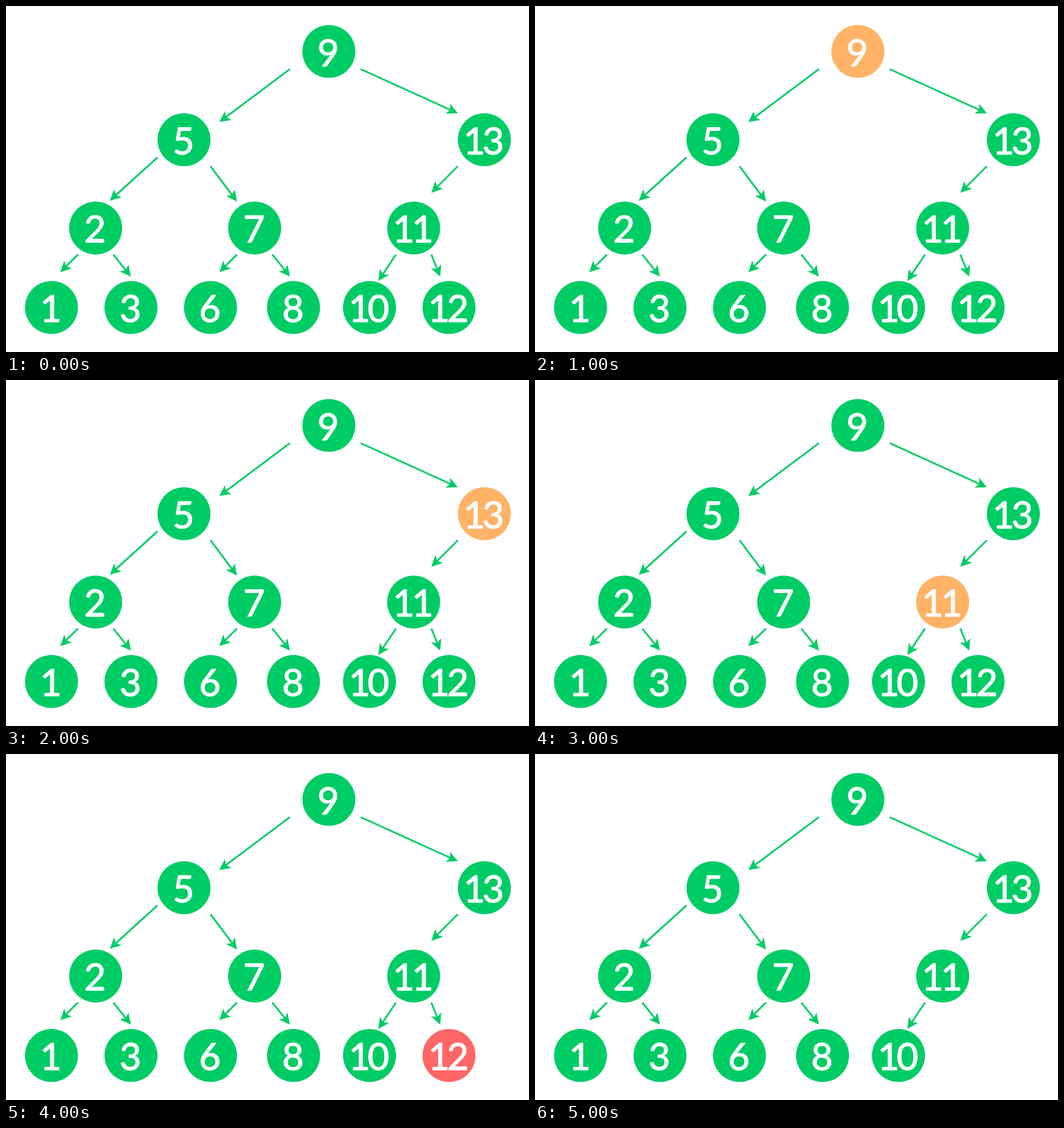
Animation of 920 by 609 pixels, one loop 6000 ms. Source, as an HTML page with a canvas:

```html
<!DOCTYPE html>
<html lang="en">
<head>
<meta charset="utf-8">
<title>Binary search tree: removing a leaf</title>
<style>
  html, body { margin: 0; width: 100%; height: 100%; overflow: hidden; background: #fff; }
  canvas { display: block; }
</style>
</head>
<body>
<canvas id="stage" width="920" height="609"></canvas>
<script>
const canvas = document.getElementById('stage');
const ctx = canvas.getContext('2d');
const GREEN = '#00cc66', ORANGE = '#ffb366', RED = '#ff6666';
const STEP = 1000;
const REMOVED = 12;

// Everything sits on a grid whose zero is the leftmost column and the root's row
const UNIT = 15.54, ORIGIN = 80;
const px = cells => ORIGIN + cells * UNIT;
const rowOf = depth => Math.min(depth * 10, 29);

// tip: where the arrow into the node ends, in cells from its centre
const node = (value, col, tip, left, right) => ({ value, col, tip, left, right });

const root = node(9, 31.4, null,
  node(5, 15, [4, -2],
    node(2, 5, [1.6, -3.1], node(1, 0, [1, -4]), node(3, 9, [0, -3.5])),
    node(7, 23, [-2, -3], node(6, 18, [1, -4]), node(8, 27.4, [0, -3.5]))),
  node(13, 49, [-3, -3],
    node(11, 41, [2, -4], node(10, 36, [1, -3]), node(12, 45, [-1, -3.5]))));

// Values met on the way down to the wanted one
function pathTo(value) {
  const path = [];
  let at = root;
  while (at) {
    path.push(at.value);
    if (at.value === value) break;
    at = value < at.value ? at.left : at.right;
  }
  return path;
}

const path = pathTo(REMOVED);
const STEPS = path.length + 2;

function drawArrow(x1, y1, x2, y2) {
  const length = Math.hypot(x2 - x1, y2 - y1);
  ctx.save();
  ctx.translate(x2, y2);
  ctx.rotate(Math.atan2(y2 - y1, x2 - x1));
  ctx.scale(UNIT, UNIT);
  ctx.fillStyle = GREEN;
  ctx.fillRect(-length / UNIT, -0.1, length / UNIT - 0.8, 0.2);
  ctx.beginPath();
  ctx.moveTo(0, 0);
  ctx.lineTo(-1.25, 0.625);
  ctx.lineTo(-0.94, 0);
  ctx.lineTo(-1.25, -0.625);
  ctx.fill();
  ctx.restore();
}

// Arrows start nearer the centre the deeper they are; wide ones leave higher up
function drawEdge(parent, child, depth) {
  const side = Math.sign(child.col - parent.col);
  const drop = Math.abs(child.col - parent.col) > 9 ? 2 : 3;
  const [dx, dy] = child.tip;
  drawArrow(
    px(Math.round(parent.col) + side * (4 - depth)), px(rowOf(depth) + drop),
    px(Math.round(child.col) + dx), px(rowOf(depth + 1) + dy));
}

function drawDisc({ value, col }, depth, color) {
  const x = px(col), y = px(rowOf(depth));
  ctx.fillStyle = color;
  ctx.beginPath();
  ctx.arc(x, y, 3 * UNIT, 0, Math.PI * 2);
  ctx.fill();

  // A thin round outline softens the ends of the digits
  ctx.fillStyle = ctx.strokeStyle = '#fff';
  ctx.fillText(value, x - 3.5, y + 25.5);
  ctx.strokeText(value, x - 3.5, y + 25.5);
}

function drawTree(at, depth, step) {
  for (const child of [at.left, at.right]) {
    if (!child || (child.value === REMOVED && step === STEPS - 1)) continue;
    drawEdge(at, child, depth);
    drawTree(child, depth + 1, step);
  }
  const marked = at.value === path[step - 1];
  const markColor = at.value === REMOVED ? RED : ORANGE;
  drawDisc(at, depth, marked ? markColor : GREEN);
}

function draw(time) {
  ctx.fillStyle = '#fff';
  ctx.fillRect(0, 0, canvas.width, canvas.height);
  ctx.font = '66px Lato, "DejaVu Sans", sans-serif';
  ctx.textAlign = 'center';
  ctx.letterSpacing = '-5px';
  ctx.lineWidth = 1.3;
  ctx.lineJoin = 'round';
  drawTree(root, 0, Math.floor(time / STEP) % STEPS);
}

const start = performance.now();
function tick() {
  draw(performance.now() - start);
  requestAnimationFrame(tick);
}
tick();
</script>
</body>
</html>
```
